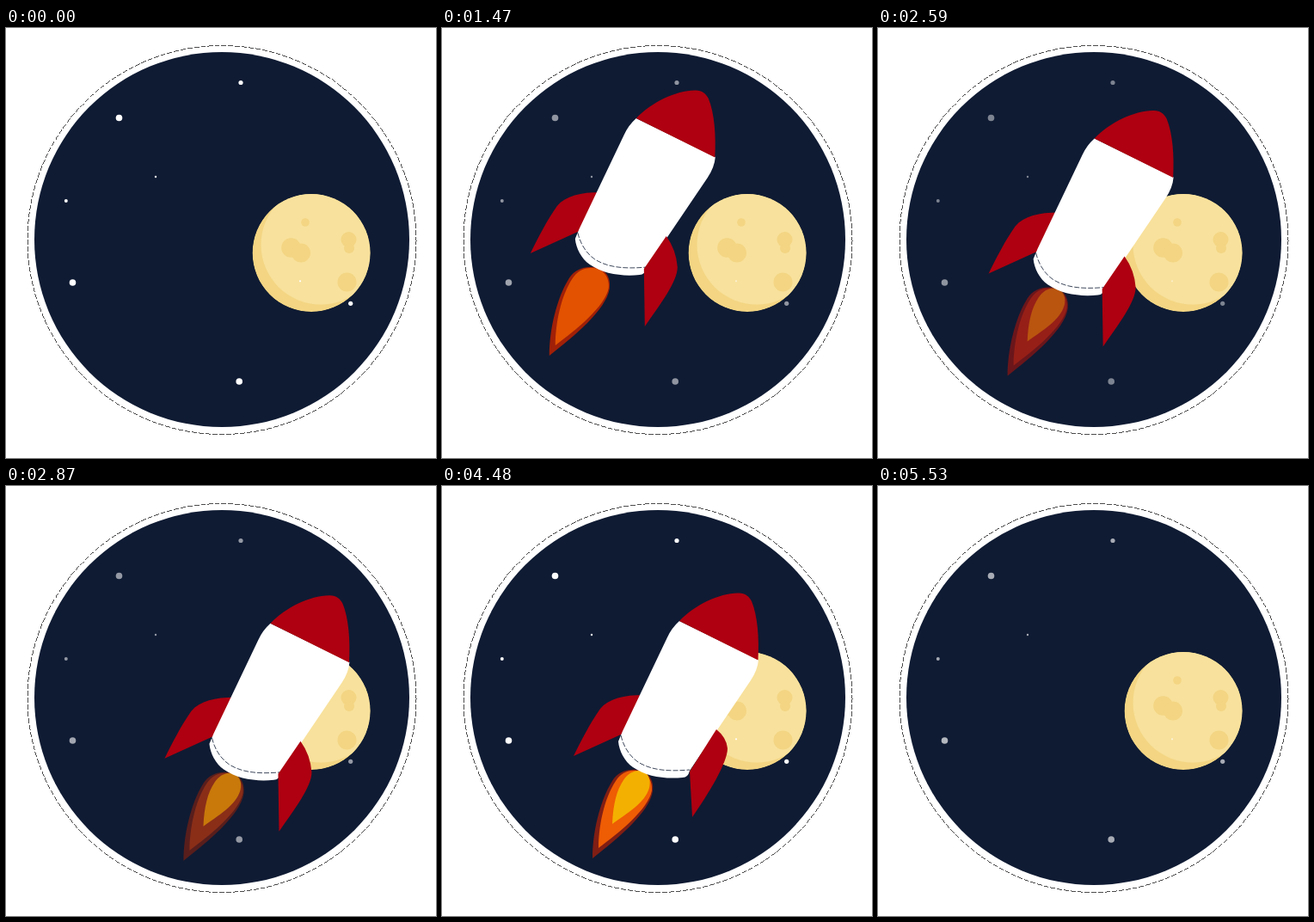
Animation, 500 px wide and 500 px high, one loop 5.6 s. Source, as an HTML page:

```html
<!DOCTYPE html>
<html lang="en">
<head>
<meta charset="utf-8">
<title>Rocket and moon</title>
<style>
  html, body { margin: 0; width: 100%; height: 100%; overflow: hidden; background: #fff; }
  svg { display: block; width: 100%; height: 100%; }
</style>
</head>
<body>
<svg viewBox="0 0 500 500">
  <defs>
    <clipPath id="sky"><circle cx="251" cy="246" r="218"/></clipPath>
    <clipPath id="disc"><circle cx="355" cy="261.5" r="68.5"/></clipPath>
  </defs>
  <circle cx="251" cy="246.5" r="226" fill="none" stroke="#000" stroke-width=".7" stroke-dasharray="6 2" shape-rendering="crispEdges"/>
  <circle cx="251" cy="246" r="218" fill="#0f1b33"/>
  <g clip-path="url(#sky)">
    <g clip-path="url(#disc)" fill="#f3d583">
      <circle cx="355" cy="261.5" r="68.5"/>
      <circle cx="366" cy="252" r="69.5" fill="#f8e19c"/>
      <circle cx="331.5" cy="255.5" r="11.3"/>
      <circle cx="343" cy="261.5" r="11"/>
      <circle cx="348" cy="226" r="4.8"/>
      <circle cx="398.5" cy="246" r="9"/>
      <circle cx="399" cy="256" r="6"/>
      <circle cx="396.5" cy="295.5" r="11"/>
    </g>
    <g id="stars" fill="#fff"></g>
    <g id="rocket">
      <path id="outer" d="M125 381C125 352 133 315 148 291C154 281 165 277 176 278C190 279 197 290 195 303C191 328 153 359 125 381Z"/>
      <path id="mid" d="M132 369C132 345 138 312 152 291C158 282 166 278 176 279C188 280 195 290 194 302C190 324 156 351 132 369Z"/>
      <path id="inner" fill="#f4b000" d="M148 341C149 318 153 302 161 290C167 281 176 277 184 280C191 283 193 291 191 299C186 317 164 329 148 341Z"/>
      <path id="left" fill="#ae0010" d="M103 262C113 242 122 224 134 207C144 195 162 191 184 191L200 220L158 237Z"/>
      <path fill="#fff" d="M226 105L318 150Q317 162 309 174L238 279Q236 287 230 287C209 289 188 286 172 275C162 268 156 256 155 245L160 233L212 124Q217 113 226 105Z"/>
      <path fill="none" stroke="#0f1b33" stroke-width=".8" stroke-dasharray="6 2" d="M158 238C161 251 168 262 178 269C194 279 214 280 238 278"/>
      <path fill="#ae0010" d="M226 105C244 86 272 73 294 72.500C302 72 307 76 310 82C317 99 319 125 317.500 150.500Z"/>
      <path id="right" fill="#ae0010"/>
    </g>
  </g>
</svg>
<script>
const LOOP = 5600, STEP = 70, TWINKLE = 2150;
const $ = id => document.getElementById(id);
const mix = (a, b, k) => a.map((v, i) => v + (b[i] - v) * k);
const linear = k => k;
const sine = k => (1 - Math.cos(Math.PI * k)) / 2;
const launch = k => k ** 2.5;

// Rows: [time, values, easing towards the next row]
const flight = [
  [0, [-220, 418], linear],
  [850, [47, 17], sine],
  [2070, [-45, -16], sine],
  [3150, [105, 68], sine],
  [4480, [50, 52], launch],
  [5400, [300, -310], linear],
  [LOOP, [420, -490]]
];
const outerTint = [
  [1470, [160, 32, 8], linear],
  [2100, [138, 8, 24], linear],
  [2870, [88, 30, 28], linear],
  [3570, [90, 28, 28], linear],
  [4480, [128, 30, 20]]
];
const midTint = [
  [1470, [226, 82, 0], linear],
  [2100, [172, 6, 22], linear],
  [2870, [138, 46, 24], linear],
  [3570, [178, 68, 14], linear],
  [4480, [238, 92, 4]]
];
const innerGlow = [
  [2100, [0], linear],
  [2870, [.58], linear],
  [3570, [.8], linear],
  [4480, [1]]
];
const leftFin = [
  [2950, [0, 0], sine],
  [3570, [29, 15], sine],
  [4250, [0, 0]]
];
// Right fin: top, outer edge, tip, inner corner
const rightFin = [
  [2950, [261, 242, 274, 278, 236, 347, 235, 280], sine],
  [3570, [241, 233, 253, 257, 222, 325, 226, 265], sine],
  [4480, [269, 231, 282, 253, 241, 333, 238, 280], sine],
  [5000, [261, 242, 274, 278, 236, 347, 235, 280]]
];

function at(rows, t) {
  if (t <= rows[0][0]) return rows[0][1];
  const i = rows.findIndex(r => r[0] > t);
  if (i < 0) return rows[rows.length - 1][1];
  const [t0, a, ease] = rows[i - 1], [t1, b] = rows[i];
  return mix(a, b, ease((t - t0) / (t1 - t0)));
}

const stars = [
  [131.5, 104.5, 3.8], [273, 63.5, 2.6], [174, 173, 1.2], [69.8, 201, 2],
  [77.5, 296, 3.8, .48], [271.2, 411, 3.8], [400.7, 320.3, 2.6], [342, 294.3, 1.1]
].map(([cx, cy, r, low = .4]) => {
  const el = document.createElementNS("http://www.w3.org/2000/svg", "circle");
  for (const [k, v] of Object.entries({ cx, cy, r })) el.setAttribute(k, v);
  $("stars").append(el);
  return { el, low };
});

const move = (el, [x, y]) => el.setAttribute("transform", `translate(${x} ${y})`);
const tint = (el, rgb) => el.setAttribute("fill", `rgb(${rgb.map(Math.round)})`);

function finPath([ax, ay, bx, by, cx, cy, dx, dy]) {
  return `M${ax} ${ay}Q${(ax + bx) / 2 + 5} ${(ay + by) / 2 - 2} ${bx} ${by}` +
    `C${bx} ${by + 17} ${cx + 18} ${cy - 26} ${cx} ${cy}L${dx} ${dy}Z`;
}

function draw(t) {
  const dim = sine(t / TWINKLE);
  for (const { el, low } of stars) el.setAttribute("opacity", 1 - (1 - low) * dim);
  move($("rocket"), at(flight, t));
  move($("left"), at(leftFin, t));
  $("right").setAttribute("d", finPath(at(rightFin, t)));
  tint($("outer"), at(outerTint, t));
  tint($("mid"), at(midTint, t));
  $("inner").setAttribute("opacity", at(innerGlow, t)[0]);
}

const start = performance.now();
function tick() {
  const t = (performance.now() - start) % LOOP;
  draw(Math.floor(t / STEP) * STEP);
  requestAnimationFrame(tick);
}
tick();
</script>
</body>
</html>
```
